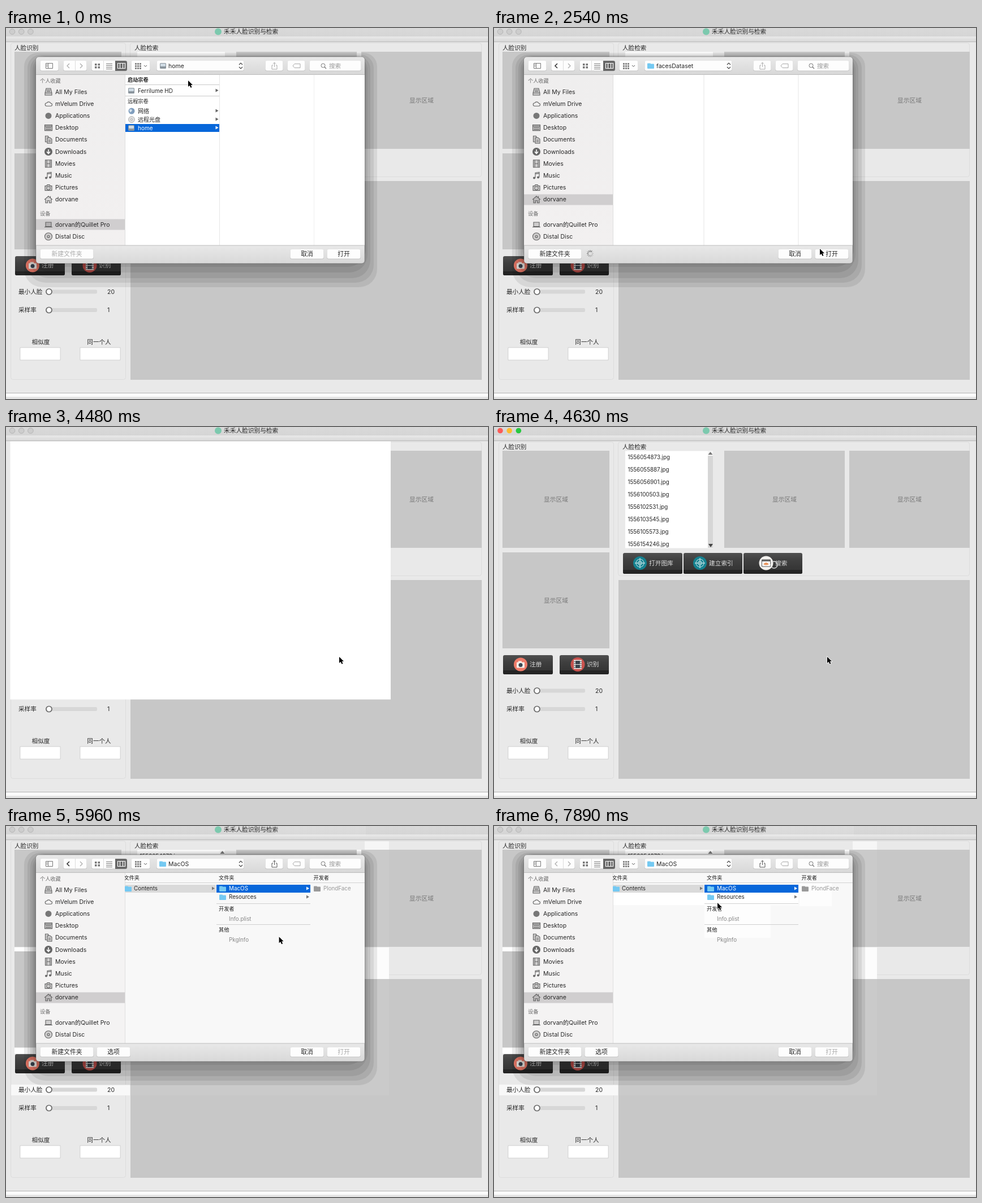
Animation, 852 px wide and 657 px high, one loop 8000 ms. Source, as an HTML page with a canvas:

```html
<!DOCTYPE html>
<html lang="zh-CN">
<head>
<meta charset="utf-8">
<style>
html, body { margin: 0; width: 100%; height: 100%; overflow: hidden; background: #e9e9e9; }
canvas { display: block; }
</style>
</head>
<body>
<canvas id="stage" width="852" height="657"></canvas>
<script>
const ctx = document.getElementById('stage').getContext('2d');
const FONT = 'Inter, "Noto Sans CJK SC", "Noto Sans CJK", sans-serif';
const LOOP = 8000, STEPS = 54;
const BLUE = '#0767da', FOLDER = '#74c9f2', GREY = '#c7c7c7';

// step, x, y of the pointer tip
const POINTER = [
  [0, 322, 93], [3, 322, 67], [4, 322, 67], [7, 322, 137], [9, 322, 137],
  [15, 598, 392], [17, 576, 391], [22, 589, 411], [30, 589, 407], [31, 589, 407],
  [35, 493, 246], [38, 493, 246], [41, 479, 179], [46, 480, 184],
  [49, 587, 129], [53, 395, 136]
];
const FILES = ['1556054873', '1556055887', '1556056901', '1556100503',
  '1556102531', '1556103545', '1556105573', '1556154246'];
const USER = 'dorvane', COMPUTER = 'dorvan的Quillet Pro';

// 14 x 14 icons
const ICONS = {
  tray: 'M3 1H11L13 9V13H1V9ZM1 9H13M4 4H10M4 6.5H10',
  cloud: 'M4 11H11A2.5 2.5 0 0 0 11 6A4 4 0 0 0 4 5.5A2.7 2.7 0 0 0 4 11Z',
  desktop: 'M.5 2H13.5V12H.5ZM.5 4.5H13.5M2 10H12M2 7H12',
  papers: 'M5 3.5H10L13 6V13.5H5ZM4.5 11H1.5V.5H6L8 3M7 8H11M7 10.5H11',
  film: 'M1.5 .5H12.5V13.5H1.5ZM4 .5V13.5M10 .5V13.5M4 7H10',
  note: 'M5 11V2L12 1V10M5 4L12 3',
  camera: 'M1 4H4L5 2H9L10 4H13V12H1ZM10 8A3 3 0 1 0 4 8A3 3 0 1 0 10 8M7 7V9',
  house: 'M0 7L7 1L14 7M2 6V13H5.5V9H8.5V13H12V6M10.5 1V4',
  laptop: 'M2 3H12V10.5H2ZM0 11.5H14',
  disc: 'M13.5 7A6.5 6.5 0 1 0 .5 7A6.5 6.5 0 1 0 13.5 7M9 7A2 2 0 1 0 5 7A2 2 0 1 0 9 7'
};

function box(x, y, w, h, fill, r = 0, stroke) {
  ctx.beginPath();
  ctx.roundRect(x, y, w, h, r);
  if (fill) { ctx.fillStyle = fill; ctx.fill(); }
  if (stroke) { ctx.strokeStyle = stroke; ctx.lineWidth = 1; ctx.stroke(); }
}
function disc(x, y, r, fill, stroke, width = 1) {
  ctx.beginPath();
  ctx.arc(x, y, r, 0, 7);
  if (fill) { ctx.fillStyle = fill; ctx.fill(); }
  if (stroke) { ctx.strokeStyle = stroke; ctx.lineWidth = width; ctx.stroke(); }
}
function text(s, x, y, size = 10.5, color = '#262626', weight = 400, align = 'left') {
  ctx.font = `${weight} ${size}px ${FONT}`;
  ctx.textAlign = align;
  ctx.textBaseline = 'middle';
  ctx.fillStyle = color;
  ctx.fillText(s, x, y + 0.5);
}
function path(d, x, y, stroke, fill, width = 1) {
  const shape = new Path2D(d);
  ctx.save();
  ctx.translate(x, y);
  if (fill) { ctx.fillStyle = fill; ctx.fill(shape); }
  if (stroke) { ctx.strokeStyle = stroke; ctx.lineWidth = width; ctx.stroke(shape); }
  ctx.restore();
}
function shade(y, h, ...colors) {
  const g = ctx.createLinearGradient(0, y, 0, y + h);
  colors.forEach((c, i) => g.addColorStop(i / (colors.length - 1), c));
  return g;
}
const centred = (s, x, y, size, color) => text(s, x, y, size, color, 400, 'center');
const folder = (x, y, color = FOLDER) => {
  box(x, y - 4.5, 6, 4, color, 1);
  box(x, y - 3.5, 12, 8.5, color, 1);
};
const drive = (x, y) => {
  box(x, y - 5, 11, 10, '#8b959d', 1.5);
  box(x + 1, y - 4, 9, 5, '#cfdbe4', 1);
};
const arrow = (x, y, color) => path('M0 -3L5 0L0 3Z', x, y, null, color);

function crosshair(x, y) {
  disc(x, y, 12, '#15818f');
  disc(x, y, 7, null, '#d9eef0');
  disc(x, y, 3.5, null, '#d9eef0');
  path('M-9 0H9M0 -9V9', x, y, '#d9eef0');
}
function cameraBadge(x, y) {
  disc(x, y, 12, '#ee7b69');
  box(x - 7, y - 4, 14, 10, '#f4eee8', 1);
  box(x - 4, y - 6, 6, 3, '#f4eee8');
  disc(x, y + 1, 3.5, '#3b4652');
}
function filmBadge(x, y) {
  disc(x, y, 12.5, '#c9524e');
  box(x - 7, y - 8, 14, 16, '#f3eeea');
  box(x - 4, y - 6.5, 8, 6, '#39424b');
  box(x - 4, y + 0.5, 8, 6, '#39424b');
  for (const dx of [-6.3, 4.8])
    for (let i = 0; i < 4; i++) box(x + dx, y - 6 + i * 3.5, 1.5, 2, '#39424b');
}
function searchBadge(x, y) {
  disc(x, y, 12.5, '#f4f2ef');
  box(x - 7.5, y - 6, 15, 12, '#fff', 0, '#555');
  box(x - 7.5, y - 6, 15, 3, '#666');
  path('M-5 2Q0 -4 5 2Q0 5 -5 2Z', x, y, null, '#e9945d');
  disc(x + 14, y + 3, 6, null, '#ddd', 1.3);
}
function darkButton(x, y, w, h, label, badge, badgeX, labelX) {
  box(x, y, w, h, shade(y, h, '#505050', '#404040', '#383838', '#333'), 3);
  box(x, y + h - 7, w, 7, '#242424', [0, 0, 3, 3]);
  badge(badgeX, y + h / 2 - 0.5);
  text(label, labelX, y + h / 2 - 0.5, 10.7, '#ddd');
}
function slider(label, y, value) {
  text(label, 22, y, 10.6);
  box(70, y - 3.5, 91, 7, '#d7d7d7', 2);
  disc(76, y, 5, '#fff', '#686868', 1.7);
  text(value, 179, y, 10.5);
}

function mainWindow(active, hasFiles) {
  box(0, 0, 852, 657, '#e9e9e9');
  box(0, 0, 852, 15, shade(0, 15, '#d9d9d9', '#d5d5d5'));
  box(0, 15, 852, 9, shade(15, 9, '#e9e9e9', '#d8d8d8'));
  box(0, 24, 852, 1, '#b9b9b9');
  ['#fc5b57', '#fdbc2e', '#27c840'].forEach((c, i) =>
    disc(11 + 16.2 * i, 6.5, 4.8, active ? c : '#cdcdcd', active ? null : '#b4b4b4'));
  disc(375, 6.5, 6, '#7cc9ae');
  text('禾禾人脸识别与检索', 385, 6.5, 10.7);

  box(8.5, 26.5, 203, 596, null, 4, '#dcdcdc');
  box(219.5, 26.5, 621, 237, null, 4, '#dcdcdc');
  text('人脸识别', 15, 35.5, 10.6);
  text('人脸检索', 227, 35.5, 10.6);
  for (const [x, y, w, h] of [[15, 42, 189, 172], [15, 222, 189, 170],
    [407, 42, 213, 172], [628, 42, 213, 172]]) {
    box(x, y, w, h, GREY);
    centred('显示区域', x + w / 2, y + h / 2, 10.7, '#777');
  }
  box(220, 271, 621, 352, GREY);

  box(232, 42.5, 155, 172, '#fff');
  if (hasFiles) {
    ctx.save();
    ctx.beginPath();
    ctx.rect(232, 43, 146, 171);
    ctx.clip();
    FILES.forEach((f, i) => text(f + '.jpg', 236.5, 54 + 22 * i, 9.8));
    ctx.restore();
    box(378, 43, 9, 171, '#d6d6d6');
    box(378, 43, 9, 8, '#f4f4f4');
    path('M-4 2H4L0 -3Z', 382.5, 47, null, '#777');
    path('M-4 -3H4L0 3Z', 383, 210, null, '#444');
  }
  darkButton(228, 223, 105, 37, '打开图库', crosshair, 258, 274);
  darkButton(335, 223, 104, 37, '建立索引', crosshair, 364, 380);
  darkButton(441, 223, 104, 37, '搜索', searchBadge, 481, 497);
  darkButton(16, 404, 88, 34, '注册', cameraBadge, 47, 63);
  darkButton(116, 404, 87, 34, '识别', filmBadge, 148, 164);
  slider('最小人脸', 467, '20');
  slider('采样率', 499.5, '1');
  centred('相似度', 61.5, 556, 10.6, '#262626');
  centred('同一个人', 164.5, 556, 10.6, '#262626');
  for (const x of [25, 131]) {
    box(x - 1, 565, 73, 24, '#dadada', 2);
    box(x + 0.5, 566.5, 70, 21, '#fff', 1);
  }
  box(0, 646, 852, 1, '#b5b5b5');
  box(0, 647, 852, 6, '#fbfbfb');
  box(0, 653, 852, 4, '#e4e4e4');
}

function lightButton(x, y, w, h) {
  box(x, y + 0.5, w, h, '#c4c4c4', 3.5);
  box(x + 0.5, y, w - 1, h - 0.5, '#fdfdfd', 3);
}
function footerButton(x, w, label, enabled = true) {
  lightButton(x, 392, w, 17);
  centred(label, x + w / 2, 400.5, 10.8, enabled ? '#262626' : '#aaa');
}

function toolbar(location, canGoBack, canShare) {
  const line = '#777';
  box(53, 52, 581, 30, shade(52, 30, '#e9e9e9', '#d8d8d8'), [5, 5, 0, 0]);
  box(53, 82, 581, 1, '#bdbdbd');
  for (const [x, w] of [[60, 33], [101, 42], [151, 63], [221, 34],
    [266, 155], [458, 32], [497, 32], [536, 92]]) lightButton(x, 58, w, 18);
  path('M70.5 62.5H82.5V71.5H70.5ZM74.5 62.5V71.5M71.5 65H73.5M71.5 67.5H73.5', 0, 0, line);
  path('M112 63L108 67L112 71', 0, 0, canGoBack ? '#333' : '#aaa', null, canGoBack ? 1.6 : 1.2);
  path('M131 63L135 67L131 71', 0, 0, '#aaa', null, 1.2);
  box(122, 58, 1, 18, '#ddd');
  box(172, 58, 1, 18, '#ddd');
  box(193, 58, 21, 18, '#686868', [0, 3, 3, 0]);
  for (const x of [157, 162.5]) for (const y of [63, 68]) box(x, y, 3.5, 3.5, line);
  path('M177 63.5H188M177 66.5H188M177 69.5H188M177 72.5H188', 0, 0, line);
  path('M197.5 62.5H210.5V71.5H197.5ZM201.5 62.5V71.5M206.5 62.5V71.5', 0, 0, '#fff', null, 1.2);
  for (let i = 0; i < 9; i++)
    box(228 + i % 3 * 4, 62 + Math.floor(i / 3) * 4, 3, 3, '#888');
  path('M244 66L246.5 68.5L249 66', 0, 0, '#555');
  if (location === 'home') drive(272, 67); else folder(271, 67);
  text(location, 287, 67, 10.5);
  path('M412 65L415 62L418 65M412 69L415 72L418 69', 0, 0, '#444', null, 1.2);
  path('M472 66H470V73H479V66H477M474.5 69V61M472 63.5L474.5 61L477 63.5', 0, 0,
    canShare ? '#555' : '#aaa');
  path('M507 67L510 63.5H520V70.5H510Z', 0, 0, '#aaa');
  disc(560.5, 66.5, 3.5, null, line);
  path('M563 69L566 72', 0, 0, line, null, 1.3);
  text('搜索', 571, 67, 10.6, '#999');
}

function sidebar(selectedY, fill) {
  box(53, 83, 157, 302, fill);
  box(210, 83, 1, 302, '#dedede');
  box(53, selectedY - 9.5, 157, 19, '#d0cecf');
  text('个人收藏', 60, 93.5, 9.2, '#6c6c6c', 500);
  text('设备', 60, 329, 9.2, '#6c6c6c', 500);
  const items = [['All My Files', 'tray'], ['mVelum Drive', 'cloud'], ['Applications'],
    ['Desktop', 'desktop'], ['Documents', 'papers'], ['Downloads', 'down'],
    ['Movies', 'film'], ['Music', 'note'], ['Pictures', 'camera'], [USER, 'house'],
    [COMPUTER, 'laptop'], ['Distal Disc', 'disc']];
  items.forEach(([label, icon], i) => {
    const y = 113 + 21.2 * i + (i > 9 ? 23 : 0);
    text(label, 87, y, 10.5);
    if (icon === 'down') {
      disc(75, y, 7, '#666');
      path('M0 -4V3M-3 0L0 3.5L3 0', 75, y, '#fff', null, 1.6);
    } else if (icon) {
      const hollow = icon === 'cloud' || icon === 'note';
      path(ICONS[icon], 68, y - 7, '#636363', hollow ? null : 'rgba(0,0,0,.15)', 1.1);
      if (icon === 'note') { disc(71, y + 4, 2, '#666'); disc(78, y + 3, 2, '#666'); }
    } else disc(75, y, 5.5, '#777');
  });
}

const heading = (s, x, y, weight = 400) => text(s, x, y, 9.2, '#1c1c1c', weight);

function volumeColumns() {
  box(377, 83, 1, 302, '#e6e6e6');
  box(544, 83, 1, 302, '#eee');
  heading('启动宗卷', 215, 91.5, 700);
  heading('远程宗卷', 215, 129.5);
  box(211, 100, 166, 1, '#c9c9c9');
  box(211, 120, 166, 1, '#c9c9c9');
  box(211, 170, 166, 14, BLUE);
  drive(216, 111);
  disc(222, 147, 5.5, '#7f9dbd');
  path('M-4 -2Q0 -5 1 -1Q-1 3 -3 2Z', 222, 147, null, '#d5e2ec');
  disc(222, 162, 5.5, '#dedede', '#b5b5b5');
  disc(222, 162, 1.5, '#fff', '#aaa');
  drive(216, 177);
  [['Ferrilume HD', 111], ['网络', 147], ['远程光盘', 162], ['home', 177]].forEach(([s, y]) => {
    const on = s === 'home';
    text(s, 233, y, 10, on ? '#fff' : '#262626');
    arrow(370.5, y - 0.5, on ? '#fff' : '#666');
  });
}

function bundleColumns(refreshed) {
  box(211, 83, 423, 302, '#f8f8f8');
  if (refreshed) {
    box(211, 118, 327, 22, '#fff');
    box(372, 140, 117, 58, '#fdfdfd');
    box(540, 101, 57, 41, '#fdfdfd');
  }
  ctx.save();
  ctx.beginPath();
  ctx.rect(210, 83, 424, 302);
  ctx.clip();
  heading('文件夹', 208.5, 91.5, 500);
  heading('文件夹', 376, 91.5, 500);
  heading('开发者', 543.5, 91.5, 500);
  box(211, 100, 423, 1, '#d2d2d2');
  box(211, 104, 160, 14, '#dadada');
  box(372, 104, 166, 14, BLUE);
  folder(210, 111);
  folder(377, 111);
  folder(377, 126);
  folder(544, 111, '#9a9a9a');
  text('Contents', 226, 111, 9.9);
  text('MacOS', 394, 111, 9.9, '#fff');
  text('Resources', 394, 126, 9.8);
  text('PlondFace', 561, 111, 9.8, '#999');
  arrow(364, 110.5, '#777');
  arrow(531, 110.5, '#fff');
  arrow(531, 125.5, '#777');
  box(372, 137, 166, 1, '#cfcfcf');
  box(372, 174, 166, 1, '#cfcfcf');
  heading('开发者', 376, 147);
  heading('其他', 376, 184);
  text('Info.plist', 394, 165, 9.8, '#888');
  text('PkgInfo', 394, 202, 9.8, '#888');
  ctx.restore();
}

function spinner(x, y, step) {
  for (let i = 0; i < 12; i++) {
    const a = i * Math.PI / 6, c = Math.cos(a), s = Math.sin(a);
    const tone = 60 + (step * 2 - i + 120) % 12 * 12;
    path(`M${3 * c} ${3 * s}L${6 * c} ${6 * s}`, x, y, `rgb(${tone},${tone},${tone})`);
  }
}

// Repainted patches left on the window around the second dialog
function brightPatches() {
  box(475, 0, 161, 17, 'rgba(255,255,255,.1)');
  box(220, 271, 457, 206, 'rgba(255,255,255,.05)');
  box(628, 42, 49, 172, 'rgba(255,255,255,.05)');
  box(620, 42, 8, 9, '#fafafa');
  box(634, 27, 43, 15, '#f6f6f6');
  box(15, 215, 38, 7, '#fff');
  box(634, 215, 43, 56, '#fcfcfc');
  box(15, 393, 189, 10, '#fff');
  box(9, 458, 210, 19, '#f8f8f8');
  slider('最小人脸', 467, '20');
}

function dialog(view, step) {
  for (const [x, y, right, bottom] of [[32, 44, 656, 459], [38, 47, 650, 451],
    [43, 49, 644, 443], [47, 50, 639, 433], [50, 51, 636, 423]])
    box(x, y, right - x, bottom - y, 'rgba(0,0,0,.08)', [24, 24, 32, 32]);
  box(53, 51, 581, 366, shade(385, 32, '#e8e8e8', '#d8d8d8'), 5, 'rgba(0,0,0,.22)');
  box(211, 83, 423, 302, '#fff');
  const bundle = view === 'bundle', volumes = view === 'volumes';
  toolbar(volumes ? 'home' : bundle ? 'MacOS' : 'facesDataset',
    !volumes && step < 45, bundle);
  sidebar(volumes ? 348 : 304, bundle ? '#f4f3f3' : shade(83, 302, '#efeeee', '#f2f0f0'));
  if (volumes) volumeColumns();
  else if (bundle) bundleColumns(step > 45);
  else {
    box(370.5, 83, 1, 302, '#e6e6e6');
    box(537.5, 83, 1, 302, '#e6e6e6');
  }
  box(53, 384.5, 581, 1, '#bdbdbd');
  footerButton(60, 95, '新建文件夹', !volumes);
  if (bundle) footerButton(160, 60, '选项');
  if (view === 'faces' && step < 21) spinner(170, 399.5, step);
  footerButton(502, 60, '取消');
  footerButton(567, 60, '打开', !bundle);
}

function locationMenu(pointerY) {
  box(241, 83, 182, 135, 'rgba(0,0,0,.04)');
  ctx.save();
  ctx.shadowColor = 'rgba(0,0,0,.35)';
  ctx.shadowBlur = 5;
  ctx.shadowOffsetY = 1;
  box(253.5, 57.5, 157, 145, shade(57, 146, '#f0f0f0', '#f1f3f3', '#e2f2f4'), 4);
  ctx.restore();
  box(254, 98, 156, 1, '#d3d6d6');
  text('最近访问的位置', 262, 109.5, 9.2, '#8b8b8b');
  [['home', 68], [COMPUTER, 84.5], ['gif', 125.5], ['facesDataset', 142],
    ['lib', 158], ['hello_falconn', 174], ['cbir', 190.5]].forEach(([label, y], i) => {
    const on = Math.abs(pointerY - y) < 8;
    if (on) box(254, y - 8, 156, 16, '#3c96fb');
    if (i === 0) {
      path('M259 68L261.5 71L266 65', 0, 0, on ? '#fff' : '#333', null, 1.2);
      drive(272, y);
    } else if (i === 1) path(ICONS.laptop, 270.5, y - 7, '#555', '#3d7fae');
    else folder(271, y);
    text(label, 287, y, 10.5, on ? '#fff' : '#262626');
  });
}

function pointerAt(step) {
  const next = POINTER.findIndex(p => p[0] > step);
  if (next < 0) return POINTER[POINTER.length - 1].slice(1);
  const [s0, x0, y0] = POINTER[next - 1], [s1, x1, y1] = POINTER[next];
  const k = (step - s0) / (s1 - s0), e = k * k * (3 - 2 * k);
  return [x0 + (x1 - x0) * e, y0 + (y1 - y0) * e];
}

function draw(step) {
  const [x, y] = pointerAt(step);
  const active = step >= 31 && step < 39;
  mainWindow(active, step >= 31);
  if (step >= 27 && step < 31) box(7.5, 25.5, 672.5, 457, '#fff');
  else if (!active) {
    if (step >= 39) brightPatches();
    dialog(step < 9 ? 'volumes' : step < 27 ? 'faces' : 'bundle', step);
    if (step >= 3 && step < 9) locationMenu(y);
  }
  const shape = 'M0 0V11L2.6 8.7L4.5 12.8L6.5 12L4.7 8H8Z';
  path(shape, x, y, '#fff', null, 1.4);
  path(shape, x, y, null, '#000');
}

function tick() {
  draw(Math.floor(performance.now() % LOOP / LOOP * STEPS));
  requestAnimationFrame(tick);
}
tick();
</script>
</body>
</html>
```
